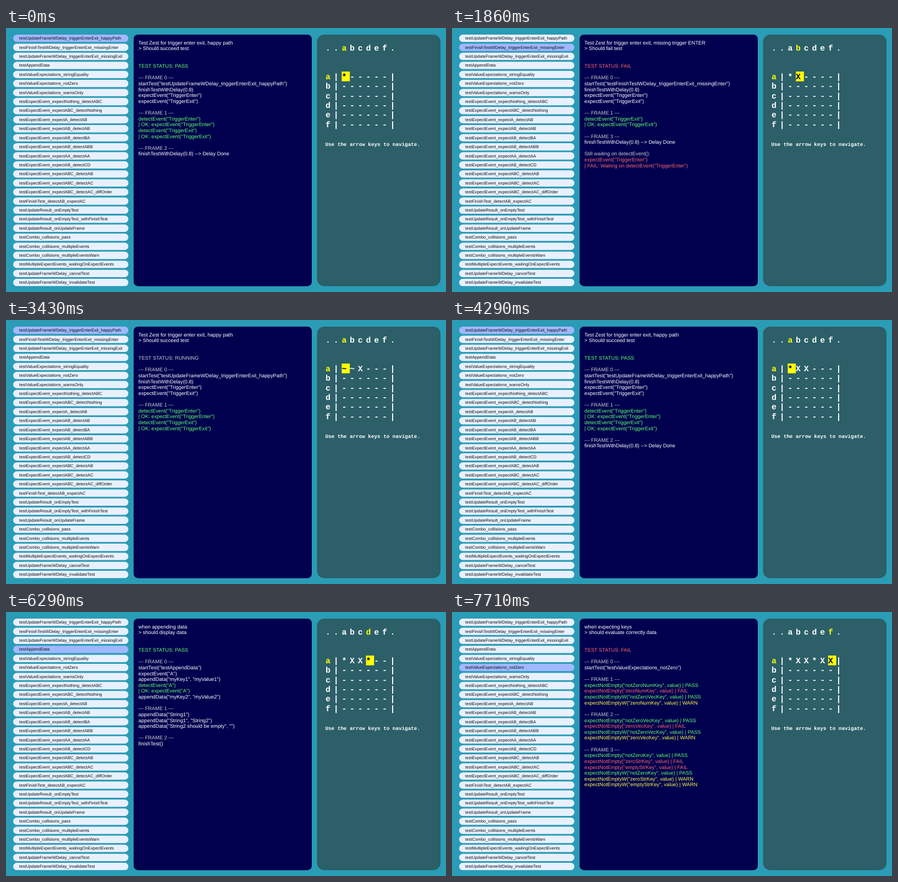
An HTML page for the animation above (8 s loop, 800 px wide and 479 px high).

```html
<!DOCTYPE html>
<html lang="en">
<head>
<meta charset="utf-8">
<title>Test runner</title>
<style>
html, body { margin: 0; width: 100%; height: 100%; overflow: hidden; background: #2a9cb6; }
svg { display: block; width: 100vw; height: 100vh; }
text { white-space: pre; text-rendering: geometricPrecision; }
.name { font: 7.73px "Liberation Sans", Arial, sans-serif; fill: #111; }
.log { font: 9.28px "Liberation Sans", Arial, sans-serif; }
.cell { font: bold 14.85px "Liberation Mono", "Courier New", monospace; }
.hint { font: bold 9.28px "Liberation Mono", "Courier New", monospace; fill: #fff; }
</style>
</head>
<body>
<svg id="stage" viewBox="0 0 800 479" preserveAspectRatio="none"></svg>
<script>
const LOOP = 8000, DELAY = 710;
const stage = document.getElementById('stage');

const NAMES = `testUpdateFrameWDelay_triggerEnterExit_happyPath
testFinishTestWDelay_triggerEnterExit_missingEnter
testUpdateFrameWDelay_triggerEnterExit_missingExit
testAppendData
testValueExpectations_stringEquality
testValueExpectations_notZero
testValueExpectations_warnsOnly
testExpectEvent_expectNothing_detectABC
testExpectEvent_expectABC_detectNothing
testExpectEvent_expectA_detectAB
testExpectEvent_expectAB_detectAB
testExpectEvent_expectAB_detectBA
testExpectEvent_expectAB_detectABB
testExpectEvent_expectAA_detectAA
testExpectEvent_expectAB_detectCD
testExpectEvent_expectABC_detectAB
testExpectEvent_expectABC_detectAC
testExpectEvent_expectABC_detectAC_diffOrder
testFinishTest_detectAB_expectAC
testUpdateResult_onEmptyTest
testUpdateResult_onEmptyTest_withFinishTest
testUpdateResult_onUpdateFrame
testCombo_collisions_pass
testCombo_collisions_multipleEvents
testCombo_collisions_multipleEventsWarn
testMultipleExpectEvents_waitingOnExpectEvents
testUpdateFrameWDelay_cancelTest
testUpdateFrameWDelay_invalidateTest`.split('\n');

const frame = n => `--- FRAME ${n} ---`;
const start = i => [frame(0), `startTest("${NAMES[i]}")`];
const detect = e => [`detectEvent("${e}")`, `| OK: expectEvent("${e}")`];
const delayed = i => [...start(i), 'finishTestWithDelay(0.8)',
  'expectEvent("TriggerEnter")', 'expectEvent("TriggerExit")', ''];
const done = n => ['', frame(n), 'finishTestWithDelay(0.8) --> Delay Done'];
const waiting = e => ['', 'Still waiting on detectEvent():', `expectEvent("${e}")`,
  `| FAIL: Waiting on detectEvent("${e}")`];
const check = (fn, key, result) => `${fn}("${key}", value) | ${result}`;
const filled = (key, result) => check('expectNotEmpty', key, result);
const filledW = (key, result) => check('expectNotEmptyW', key, result);

// body: shown from the start of a run; tail: added when the run ends
const TESTS = [
  { title: 'Test Zest for trigger enter exit, happy path', goal: 'Should succeed test',
    pass: true, time: DELAY,
    body: [...delayed(0), frame(1), ...detect('TriggerEnter'), ...detect('TriggerExit')],
    tail: done(2) },
  { title: 'Test Zest for trigger enter exit, missing trigger ENTER', goal: 'Should fail test',
    time: DELAY,
    body: [...delayed(1), frame(1), ...detect('TriggerExit')],
    tail: [...done(3), ...waiting('TriggerEnter')] },
  { title: 'Test Zest for trigger enter exit, missing trigger EXIT', goal: 'Should fail test',
    time: DELAY,
    body: [...delayed(2), frame(3), ...detect('TriggerEnter')],
    tail: [...done(4), ...waiting('TriggerExit')] },
  { title: 'when appending data', goal: 'should display data', pass: true, time: 0,
    body: [...start(3), 'expectEvent("A")', 'appendData("myKey1", "myValue1")',
      ...detect('A'), 'appendData("myKey2", "myValue2")', '',
      frame(1), 'appendData("String1")', 'appendData("String1", "String2")',
      'appendData("String2 should be empty", "")', '', frame(2), 'finishTest()'],
    tail: [] },
  { title: 'when expecting keys', goal: 'should evaluate correctly data', time: 0,
    body: [...start(4), '', frame(1),
      check('expectEqual', 'sameStrKey', 'PASS'), check('expectEqual', 'diffStrKey', 'FAIL'),
      check('expectEqualW', 'sameStrKey', 'PASS'), check('expectEqualW', 'diffStrKey', 'WARN')],
    tail: [] },
  { title: 'when expecting keys', goal: 'should evaluate correctly data', time: 0,
    body: [...start(5), '',
      frame(1), filled('notZeroNumKey', 'PASS'), filled('zeroNumKey', 'FAIL'),
      filledW('notZeroVecKey', 'PASS'), filledW('zeroNumKey', 'WARN'), '',
      frame(2), filled('notZeroVecKey', 'PASS'), filled('zeroVecKey', 'FAIL'),
      filledW('notZeroVecKey', 'PASS'), filledW('zeroVecKey', 'WARN'), '',
      frame(3), filled('notZeroKey', 'PASS'), filled('zeroStrKey', 'FAIL'),
      filled('emptyStrKey', 'FAIL'), filledW('notZeroKey', 'PASS'),
      filledW('zeroStrKey', 'WARN'), filledW('emptyStrKey', 'WARN')],
    tail: [] }
];

// [time, test]: each selection starts a new run
const PICKS = [[-1000, 0], [860, 1], [2140, 2], [3290, 1], [3430, 0],
  [5140, 1], [5290, 2], [5710, 3], [6710, 4], [7570, 5]];

function add(tag, attrs, content = '') {
  const el = document.createElementNS('http://www.w3.org/2000/svg', tag);
  for (const key in attrs) el.setAttribute(key, attrs[key]);
  el.textContent = content;
  return stage.appendChild(el);
}
const box = (x, y, width, height, rx, fill) => add('rect', { x, y, width, height, rx, fill });

box(0, 0, 800, 479, 0, '#2a9cb6');
const pills = NAMES.map((name, i) => {
  const y = 12 + i * 16.41;
  const pill = box(13, y, 209.5, 13.3, 6.65, '#e8f0fe');
  add('text', { x: 24, y: y + 9.2, class: 'name' }, name);
  return pill;
});
box(232, 12, 324, 456.4, 8, '#00004f');
box(565.5, 12, 224.5, 456.4, 13, '#2c5f68');

const logLines = Array.from({ length: 28 }, (_, i) =>
  add('text', { x: 240.8, y: 29.5 + i * 10.625, class: 'log' }));

const STEP = 14.7, LEFT = 581;
const cursor = box(610.4, 79, 14.7, 17.7, 0, '#ff0');
const cellRow = (chars, y) => [...chars].map((char, i) =>
  add('text', { x: LEFT + i * STEP, y, class: 'cell', fill: '#fff' }, char));
const header = cellRow('..abcdef.', 41);
const grid = [...'abcdef'].map((c, i) => cellRow(c + '|------|', 93 + i * 17.35));
grid[0][0].setAttribute('fill', '#ff0');
add('text', { x: 580.5, y: 214.3, class: 'hint' }, 'Use the arrow keys to navigate.');

function lineColor(line) {
  if (/^---|^Still|RUNNING/.test(line)) return '#ccc';
  if (/PASS$|^detect|^\| OK/.test(line)) return '#6f6';
  if (/FAIL/.test(line)) return '#f66';
  if (/WARN$/.test(line)) return '#ff4';
  return '#fff';
}

function render(t) {
  const marks = TESTS.map(() => '-');
  let current = 0;
  for (const [at, i] of PICKS) {
    if (t < at) break;
    current = i;
    marks[i] = t < at + TESTS[i].time ? '~' : TESTS[i].pass ? '*' : 'X';
  }

  const test = TESTS[current], running = marks[current] === '~';
  const status = running ? 'RUNNING' : test.pass ? 'PASS' : 'FAIL';
  const lines = [test.title, '> ' + test.goal, '', '', 'TEST STATUS: ' + status, '',
    ...test.body, ...(running ? [] : test.tail)];
  const stillAt = lines.findIndex(line => line.startsWith('Still'));
  logLines.forEach((el, i) => {
    const line = lines[i] || '';
    el.textContent = line;
    el.setAttribute('fill', stillAt >= 0 && i > stillAt ? '#f66' : lineColor(line));
  });

  pills.forEach((el, i) => el.setAttribute('fill', i === current ? '#a0b8ff' : '#e8f0fe'));
  cursor.setAttribute('x', LEFT + (current + 2) * STEP);
  marks.forEach((mark, i) => {
    const cell = grid[0][i + 2];
    cell.textContent = mark;
    cell.setAttribute('fill', i === current ? '#000' : '#fff');
    header[i + 2].setAttribute('fill', i === current ? '#ff0' : '#fff');
  });
}

const began = performance.now();
function tick() {
  render((performance.now() - began) % LOOP);
  requestAnimationFrame(tick);
}
tick();
</script>
</body>
</html>
```
